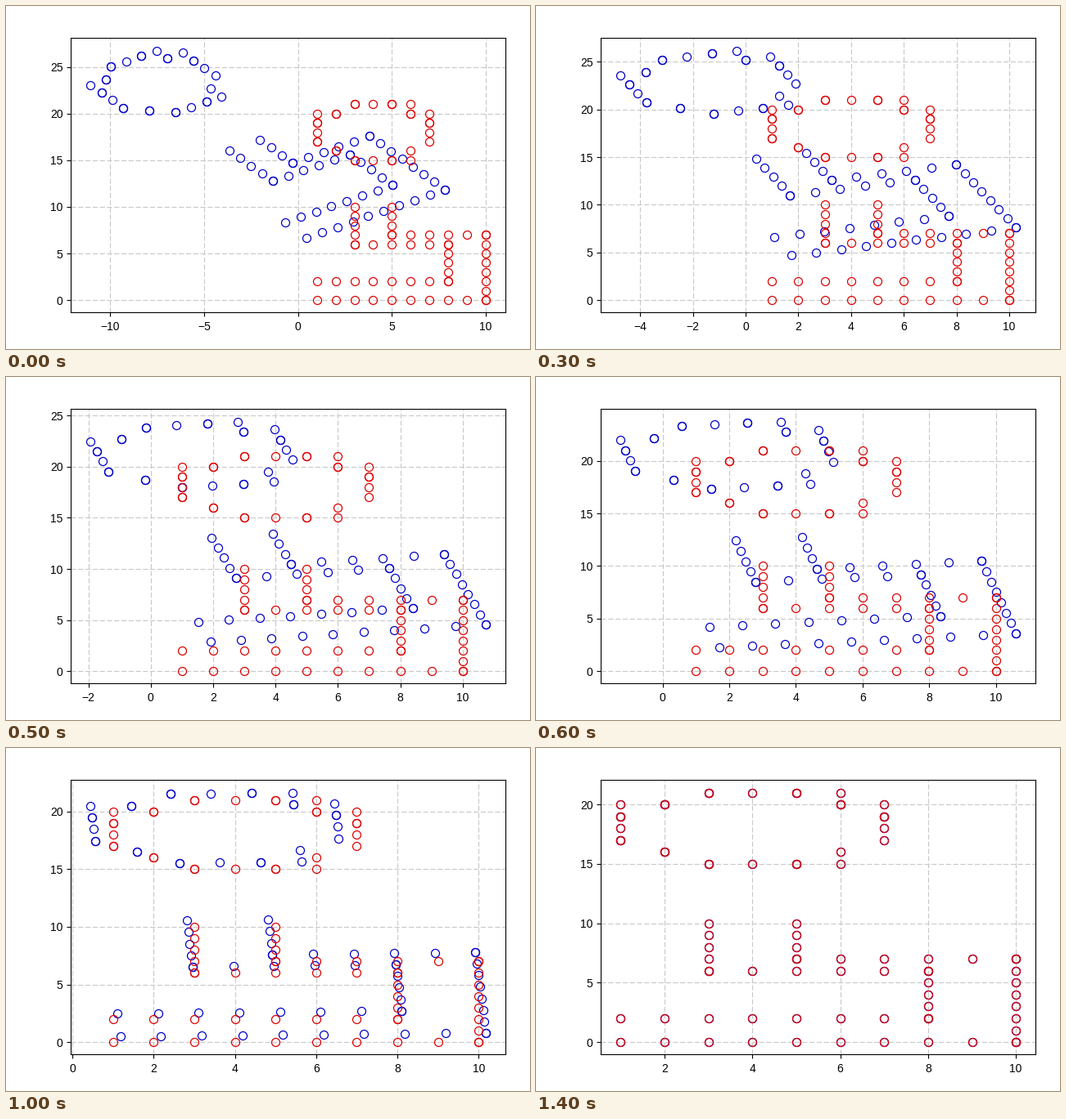
Recreate the animation shown at these times as a matplotlib script. Size 640 by 420 pixels, loop 1500 ms.

```python
import numpy as np
import matplotlib.pyplot as plt
from matplotlib.animation import FuncAnimation
from matplotlib.ticker import MaxNLocator

WIDTH, HEIGHT, DPI = 640, 420, 100
FRAMES = 15
plt.rcParams["font.family"] = "Liberation Sans"
plt.rcParams["font.size"] = 10

# Corners of the strokes; a corner shared by two sides carries two rings.
LOWER_LEG = [(1, 0), (10, 0), (10, 7), (5, 7), (5, 10)]
UPPER_LEG = [(1, 2), (8, 2), (8, 6), (3, 6), (3, 10)]
HEAD = [(6, 15), (5, 15), (3, 15), (2, 16), (1, 17), (1, 19), (2, 20),
        (3, 21), (5, 21), (6, 20), (7, 19), (7, 17)]
LOOSE = [(1, 20), (6, 21), (7, 20), (6, 16)]
PIVOT = np.array([5, 8.5])

# Key poses of the moving copy: step, angle in degrees, shift of the pivot.
KEY_POSES = np.array([
    (0, 35.1, -6.15, 7.45),
    (1, 24.75, -3.78, 7.0),
    (3, 14.4, -1.04, 4.4),
    (5, 8.5, -0.6, 2.74),
    (7, 5, -0.17, 1.29),
    (9, 2.1, -0.13, 0.61),
    (12, 0, 0, 0),
])


def side(start, end):
    start, end = np.array(start), np.array(end)
    steps = np.abs(end - start).max()
    return start + np.linspace(0, 1, steps + 1)[:, None] * (end - start)


def build_shape():
    sides = [side(a, b) for stroke in (LOWER_LEG, UPPER_LEG, HEAD)
             for a, b in zip(stroke, stroke[1:])]
    return np.vstack(sides + [LOOSE])


def progress(step):
    """Each step closes a constant share of the remaining gap."""
    return 1 - 0.77 ** step


def pose_at(step):
    steps, *columns = KEY_POSES.T
    return [np.interp(progress(step), progress(steps), c) for c in columns]


def place(points, angle, dx, dy):
    cos, sin = np.cos(np.radians(angle)), np.sin(np.radians(angle))
    rotation = np.array([[cos, -sin], [sin, cos]])
    return (points - PIVOT) @ rotation.T + PIVOT + (dx, dy)


def padded(values, margin=0.05):
    low, high = values.min(), values.max()
    pad = margin * (high - low)
    return low - pad, high + pad


fixed = build_shape()

fig = plt.figure(figsize=(WIDTH / DPI, HEIGHT / DPI), dpi=DPI, facecolor="white")
left, right, top, bottom = 79.3, 610.3, 39.3, 375.4
ax = fig.add_axes([left / WIDTH, 1 - bottom / HEIGHT,
                   (right - left) / WIDTH, (bottom - top) / HEIGHT])
ax.grid(linestyle=(0, (5.5, 2.4)), color="#c8c8c8", linewidth=0.8)
ax.set_axisbelow(True)
ax.tick_params(axis="x", pad=4.2)
for axis in (ax.xaxis, ax.yaxis):
    axis.set_major_locator(MaxNLocator(nbins=9, steps=[1, 2, 5, 10]))

rings = dict(linestyle="none", marker="o", markersize=7.2,
             markerfacecolor="none", markeredgewidth=0.9)
moving_rings, = ax.plot([], [], markeredgecolor="#0000c8", **rings)
fixed_rings, = ax.plot(*fixed.T, markeredgecolor="#dc0000", **rings)


def update(frame):
    # The starting pose is held for two frames.
    moving = place(fixed, *pose_at(max(frame - 1, 0)))
    moving_rings.set_data(*moving.T)
    both = np.vstack([fixed, moving])
    ax.set_xlim(*padded(both[:, 0]))
    ax.set_ylim(*padded(both[:, 1]))
    return moving_rings, fixed_rings


anim = FuncAnimation(fig, update, frames=FRAMES, interval=100,
                     repeat=True, repeat_delay=0, blit=False)
plt.show()
```
